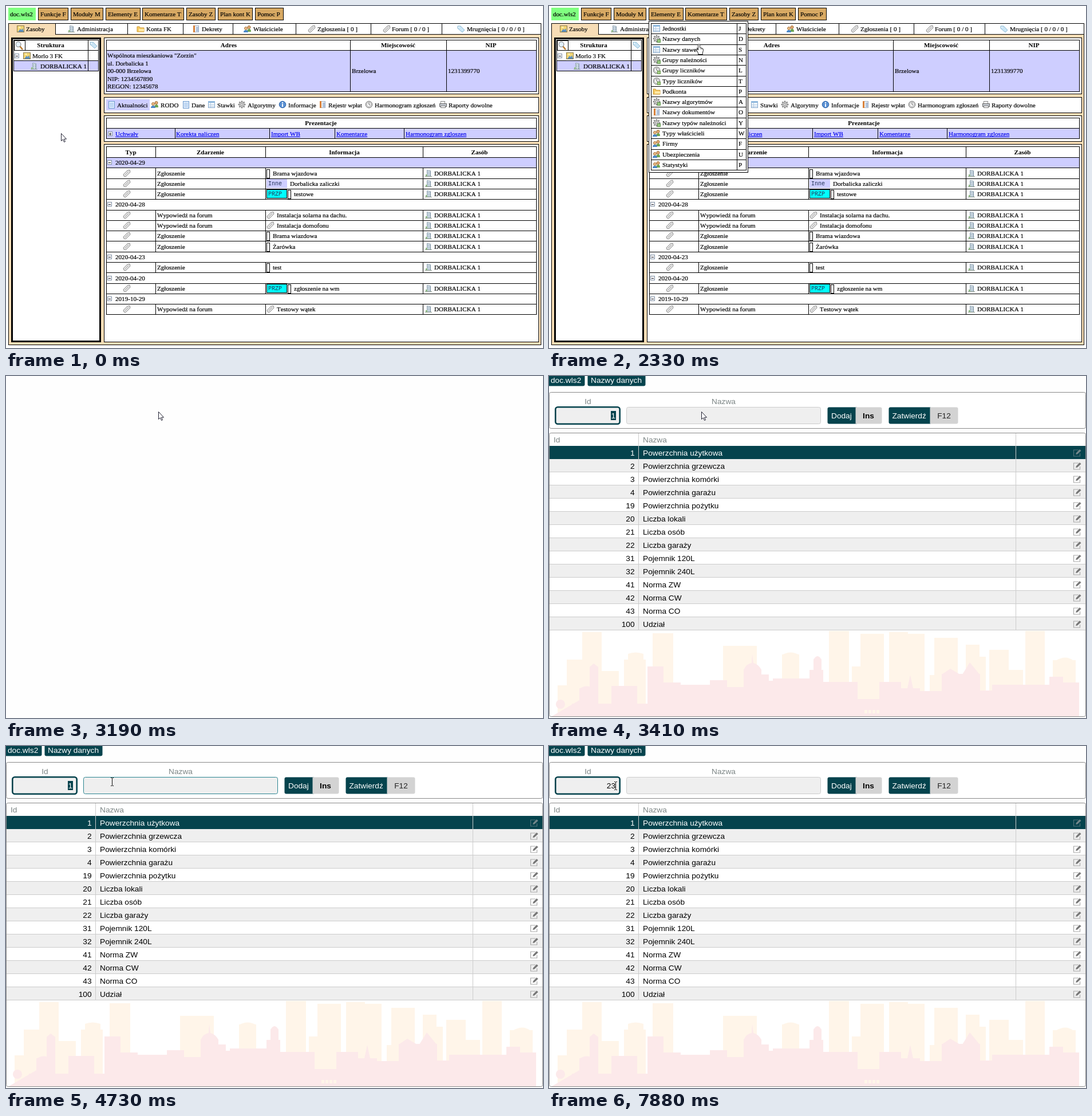
Write an HTML page with a canvas that moves like this. It is 938 px wide and 597 px high and loops after 7990 ms.

```html
<!DOCTYPE html>
<html lang="pl">
<head>
<meta charset="utf-8">
<title>Nazwy danych</title>
<style>
html, body { margin: 0; width: 100%; height: 100%; overflow: hidden; background: #fefefe; }
canvas { display: block; }
</style>
</head>
<body>
<canvas id="stage" width="938" height="597"></canvas>
<script>
const ctx = document.getElementById('stage').getContext('2d');
const LOOP = 7990;
const MENU_OPENS = 1460, PAGE_LEAVES = 3190, FORM_SHOWS = 3400, FORM_HOVER = 3530;
const SERIF = '"Liberation Serif", serif', SANS = '"Liberation Sans", sans-serif';
const WHEAT = '#f7ddb6', TAN = '#d8a963', LILAC = '#ceceff', TEAL = '#05434d', GREY = '#efefef';

// ---------- helpers ----------
function rect(x, y, w, h, fill, stroke, line = 1) {
  if (fill) { ctx.fillStyle = fill; ctx.fillRect(x, y, w, h); }
  if (stroke) {
    ctx.strokeStyle = stroke;
    ctx.lineWidth = line;
    ctx.strokeRect(x + line / 2, y + line / 2, w - line, h - line);
  }
}
function round(x, y, w, h, r, fill, stroke, line = 1) {
  ctx.beginPath();
  ctx.roundRect(x + line / 2, y + line / 2, w - line, h - line, r);
  if (fill) { ctx.fillStyle = fill; ctx.fill(); }
  if (stroke) { ctx.strokeStyle = stroke; ctx.lineWidth = line; ctx.stroke(); }
}
const hLine = (x1, x2, y, color = '#000') => rect(x1, Math.round(y), x2 - x1, 1, color);
const vLine = (x, y1, y2, color = '#000') => rect(x, Math.round(y1), 1, Math.round(y2) - Math.round(y1), color);
function text(str, x, y, font, color = '#000', align = 'left') {
  ctx.font = font;
  ctx.fillStyle = color;
  ctx.textAlign = align;
  ctx.fillText(str, x, y);
}
// Small serif text gets a hairline outline so that thin stems stay dark.
function serif(str, x, y, color = '#000') {
  text(str, x, y, '11.1px ' + SERIF, color);
  ctx.strokeStyle = color;
  ctx.lineWidth = .2;
  ctx.strokeText(str, x, y);
}
const heading = (str, x, y) => text(str, x, y, 'bold 11.1px ' + SERIF, '#000', 'center');
const sans = (str, x, y, color, align, weight = '') => text(str, x, y, weight + ' 13.7px ' + SANS, color, align);
function disc(x, y, r, fill, stroke) {
  ctx.beginPath();
  ctx.arc(x, y, r, 0, Math.PI * 2);
  if (fill) { ctx.fillStyle = fill; ctx.fill(); }
  if (stroke) { ctx.strokeStyle = stroke; ctx.lineWidth = 1; ctx.stroke(); }
}
function shape(d, fill, stroke, line = 1) {
  const p = new Path2D(d);
  if (fill) { ctx.fillStyle = fill; ctx.fill(p); }
  if (stroke) { ctx.strokeStyle = stroke; ctx.lineWidth = line; ctx.stroke(p); }
}

// ---------- icons, drawn around their centre ----------
const icons = {
  picture() {
    rect(-7, -6, 13, 12, '#f2d675', '#8c7a4a');
    shape('M-5 5L-1 0L1 2L3 -1L5 5Z', '#5b8fc0');
    disc(-2, -3, 1.5, '#fff6c0');
  },
  building() {
    shape('M-2.500 5.500V-5.500L3.500 -4.500V5.500Z', '#d3dfe8', '#8fa0ae');
    for (let y = -3; y < 4; y += 3) { rect(-1, y, 1, 2, '#7e98ad'); rect(2, y, 1, 2, '#7e98ad'); }
    rect(-5, 2, 3, 4, '#93bd8b');
    rect(-6, 5, 12, 1, '#8f9c8f');
  },
  folder() {
    shape('M-6 -4H-2L-1 -2H6V5H-6Z', '#f5ca62', '#cf9b37');
    rect(-3, 0, 9, 4, '#ffe9a5');
  },
  book() {
    rect(-4, -6, 9, 12, '#eef2f8', '#9cabc1');
    rect(-5, -6, 3, 12, '#d8823c');
    for (let y = -3; y < 4; y += 2) hLine(0, 4, y, '#7796c0');
  },
  people() {
    disc(2.5, -3, 2.5, '#e6b077', '#9c632d');
    shape('M-1 5Q-1 0 3 0Q6 0 6 5Z', '#6da552');
    disc(-3, -1, 2.4, '#efc38d', '#a46c34');
    shape('M-7 6Q-7 2 -3 2Q1 2 1 6Z', '#4a87c7');
  },
  clip() {
    shape('M-6 2L1 -5L5 -6L6 -2L-1 5Q-3 7 -5 5Z', '#e4e4e4', '#8e8e8e');
    shape('M-3 3L3 -3', null, '#a2a2a2');
  },
  tag() {
    shape('M-6 -5H-1L6 2L2 6L-6 -1Z', '#cae5f5', '#8bb8d2');
    disc(-4, -3, 1, '#fff');
  },
  doc() {
    rect(-5, -6, 11, 13, '#e3efff', '#6a98cd');
    for (let y = -3; y < 4; y += 2) hLine(-3, 4, y, '#a0c2e8');
  },
  list() {
    rect(-6, -6, 12, 12, '#f2f8ff', '#86a9ce');
    rect(-6, -6, 12, 3, '#8fb8dd');
    hLine(-5, 5, 0, '#b6cbe0');
    hLine(-5, 5, 3, '#b6cbe0');
    vLine(-2, -3, 5, '#b6cbe0');
  },
  gear() {
    for (let i = 0; i < 8; i++) {
      ctx.save();
      ctx.rotate(i * Math.PI / 4);
      rect(-1.2, -6.5, 2.4, 3, '#8c8c8c');
      ctx.restore();
    }
    disc(0, 0, 4.3, '#d0d0d0', '#888');
    disc(0, 0, 1.7, '#fff', '#888');
  },
  gears() {
    icons.gear();
    rect(1, 1, 6, 6, '#9ccb85', '#5d944a');
  },
  clock() {
    disc(0, 0, 5.8, '#e2e2e2', '#777');
    disc(0, 0, 3.8, '#fff', '#aaa');
    shape('M0 -3V0L2 1', null, '#555');
  },
  meter() {
    icons.clock();
    rect(1, 1, 6, 6, '#a4cc84', '#67964a');
  },
  info() {
    disc(0, 0, 5.8, '#5a90d2', '#2e63a8');
    rect(-1, -4, 2, 2, '#fff');
    rect(-1, -1, 2, 5, '#fff');
  },
  printer() {
    rect(-4, -6, 8, 6, '#fff', '#888');
    rect(-6, -2, 13, 6, '#c3c8cf', '#666');
    rect(-4, 2, 9, 4, '#fff', '#777');
  },
  search() {
    shape('M1 1L6 7', null, '#b87a2f', 2.5);
    disc(-1.5, -2, 4.5, '#e4f1fb', '#777');
  },
  minus() {
    rect(-4, -4, 8, 8, '#f4f4f4', '#8393a8');
    rect(-2, 0, 4, 1, '#223');
  },
  plus() {
    icons.minus();
    rect(-0.5, -2, 1, 5, '#223');
  }
};
function icon(name, x, y) {
  ctx.save();
  ctx.translate(Math.round(x), Math.round(y));
  icons[name]();
  ctx.restore();
}

// ---------- first screen ----------
const STREET = 'Dorbalicka', CITY = 'Brzelowa', UNIT = STREET.toUpperCase() + ' 1';
const buttons = [['Funkcje F', 56, 109], ['Moduły M', 113, 170], ['Elementy E', 174, 235], ['Komentarze T', 238, 311],
  ['Zasoby Z', 315, 366], ['Plan kont K', 370, 431], ['Pomoc P', 435, 485]];
const tabs = [['picture', 26, 'Zasoby', 35], ['building', 114, 'Administracja', 124], ['folder', 235, 'Konta FK', 245],
  ['book', 332, 'Dekrety', 342], ['people', 422, 'Właściciele', 432], ['clip', 534, 'Zgłoszenia [ 0 ]', 544],
  ['clip', 665, 'Forum [ 0 / 0 ]', 674], ['tag', 795, 'Mrugnięcia [ 0 / 0 / 0 ]', 805]];
const tools = [['doc', 184, 'Aktualności'], ['people', 260, 'RODO'], ['doc', 314, 'Dane'], ['list', 359, 'Stawki'],
  ['gear', 412, 'Algorytmy'], ['info', 483, 'Informacje'], ['book', 553, 'Rejestr wpłat'],
  ['clock', 634, 'Harmonogram zgłoszeń'], ['printer', 763, 'Raporty dowolne']];
const links = [['Uchwały', 191], ['Korekta naliczen', 297], ['Import WB', 463], ['Komentarze', 577], ['Harmonogram zgloszen', 698]];
const events = [['date', '2020-04-29'], ['bar', 'Brama wjazdowa'], ['inne', STREET + ' zaliczki'], ['przp', 'testowe'],
  ['date', '2020-04-28'], ['forum', 'Instalacja solarna na dachu.'], ['forum', 'Instalacja domofonu'],
  ['bar', 'Brama wiazdowa'], ['bar', 'Żarówka'], ['date', '2020-04-23'], ['bar', 'test'],
  ['date', '2020-04-20'], ['przp', 'zgłoszenie na wm'], ['date', '2019-10-29'], ['forum', 'Testowy wątek']];
const menu = [['list', 'Jednostki', 'J'], ['gears', 'Nazwy danych', 'D'], ['list', 'Nazwy stawek', 'S'],
  ['gears', 'Grupy należności', 'N'], ['meter', 'Grupy liczników', 'L'], ['meter', 'Typy liczników', 'T'],
  ['folder', 'Podkonta', 'P'], ['gears', 'Nazwy algorytmów', 'A'], ['book', 'Nazwy dokumentów', 'O'],
  ['gears', 'Nazwy typów należności', 'Y'], ['people', 'Typy właścicieli', 'W'], ['people', 'Firmy', 'F'],
  ['people', 'Ubezpieczenia', 'U'], ['people', 'Statystyki', 'P']];
const STEP = 18.3;

const panel = (y, h) => rect(171, y, 760, h, '#fff', '#000');
const badge = (str, y, fill, stroke) => {
  rect(455, y - 8, 36, 16, fill, stroke);
  text(str, 458, y + 3, '10px "Liberation Mono", monospace', '#235');
};

function drawTop() {
  rect(4, 3, 48, 22, '#80ff80');
  serif('doc.wls2', 7, 18);
  for (const [label, x1, x2] of buttons) {
    rect(x1, 3, x2 - x1, 22, TAN, '#000');
    serif(label, x1 + 4, 18);
  }
  rect(4, 49, 931, 543, WHEAT, '#000');
  rect(4, 30, 931, 20, '#fff', '#000');
  rect(5, 31, 82, 19, WHEAT);
  for (const x of [86, 212, 309, 396, 506, 637, 761]) vLine(x, 30, 50);
  for (const [name, x, label, tx] of tabs) {
    icon(name, x, 40);
    serif(label, tx, 44);
  }
}

function drawTree() {
  rect(9, 55, 157, 532, '#fff', '#000', 3);
  rect(13, 59, 149, 55, '#fff', '#000');
  rect(14, 96, 147, 17, LILAC);
  hLine(13, 162, 77);
  hLine(13, 162, 95);
  vLine(143, 59, 114);
  rect(14, 60, 20, 18, '#fff', '#000');
  icon('search', 23, 69);
  heading('Struktura', 78, 72);
  icon('tag', 153, 68);
  icon('minus', 19, 87);
  icon('picture', 37, 87);
  serif('Morlo 3 FK', 46, 91);
  icon('building', 49, 105);
  serif(UNIT, 60, 109);
}

function drawDetails() {
  panel(55, 99);
  rect(175, 59, 752, 91, LILAC, '#000');
  rect(176, 60, 750, 17, '#fff');
  hLine(175, 927, 77);
  vLine(601, 59, 150);
  vLine(769, 59, 150);
  heading('Adres', 389, 72);
  heading('Miejscowość', 685, 72);
  heading('NIP', 847, 72);
  ['Wspólnota mieszkaniowa "Zorzin"', 'ul. ' + STREET + ' 1', '00-000 ' + CITY, 'NIP: 1234567890', 'REGON: 12345678']
    .forEach((line, i) => serif(line, 177, Math.round(90 + i * 13.6)));
  serif(CITY, 604, 117);
  serif('1231399770', 772, 117);

  panel(159, 28);
  rect(175, 163, 76, 19, LILAC);
  for (const [name, x, label] of tools) {
    icon(name, x, 172);
    serif(label, x + 10, 177);
  }

  panel(191, 46);
  rect(175, 195, 752, 37, LILAC, '#000');
  rect(176, 196, 750, 17, '#fff');
  hLine(175, 927, 213);
  heading('Prezentacje', 550, 208);
  for (const x of [295, 460, 574, 695]) vLine(x, 213, 232);
  icon('plus', 182, 223);
  for (const [label, x] of links) {
    serif(label, x, 227, '#00e');
    hLine(x, x + ctx.measureText(label).width, 228, '#00e');
  }
}

function drawEvents() {
  panel(241, 346);
  rect(175, 245, 752, 294, '#fff', '#000');
  rect(176, 265, 750, 17, LILAC);
  const columns = (y1, y2) => [261, 453, 728].forEach(x => vLine(x, y1, y2));
  columns(245, 264);
  heading('Typ', 218, 259);
  heading('Zdarzenie', 357, 259);
  heading('Informacja', 591, 259);
  heading('Zasób', 827, 259);
  events.forEach(([kind, label], i) => {
    const top = 264 + i * STEP, y = Math.round(top + 9.2), base = y + 4;
    hLine(175, 927, top);
    if (kind === 'date') {
      icon('minus', 181, y);
      serif(label, 191, base);
      return;
    }
    columns(top, top + STEP);
    icon('clip', 211, y);
    serif(kind === 'forum' ? 'Wypowiedź na forum' : 'Zgłoszenie', 264, base);
    let x = 466;
    if (kind === 'forum') { icon('clip', 462, y); x = 473; }
    if (kind === 'bar') rect(455, y - 7, 6, 16, '#fff', '#000');
    if (kind === 'inne') { badge('Inne', y, LILAC); x = 496; }
    if (kind === 'przp') {
      badge('PRZP', y, '#0ff', '#000');
      rect(492, y - 7, 6, 16, '#fff', '#000');
      x = 503;
    }
    serif(label, x, base);
    icon('building', 738, y);
    serif(UNIT, 748, base);
  });
}

function drawMenu() {
  rect(174, 26, 174, 265, '#fff', '#000');
  rect(178, 30, 167, 257, '#fff', '#000');
  vLine(328, 30, 287);
  menu.forEach(([name, label, key], i) => {
    const y = 30 + i * STEP;
    if (i) hLine(178, 345, y);
    icon(name, 188, y + 9);
    serif(label, 198, Math.round(y + 13));
    serif(key, 331, Math.round(y + 13));
  });
}

// ---------- second screen ----------
const records = [[1, 'Powerzchnia użytkowa'], [2, 'Powierzchnia grzewcza'], [3, 'Powierzchnia komórki'],
  [4, 'Powierzchnia garażu'], [19, 'Powierzchnia pożytku'], [20, 'Liczba lokali'], [21, 'Liczba osób'],
  [22, 'Liczba garaży'], [31, 'Pojemnik 120L'], [32, 'Pojemnik 240L'], [41, 'Norma ZW'], [42, 'Norma CW'],
  [43, 'Norma CO'], [100, 'Udział']];
// Buildings as left, right, top.
const towers = [[15, 31, 540], [31, 58, 495], [58, 92, 447], [92, 122, 515], [131, 169, 495], [138, 165, 485],
  [181, 217, 449], [304, 363, 471], [407, 437, 486], [489, 524, 445], [529, 545, 507], [544, 585, 450],
  [594, 627, 447], [627, 656, 450], [673, 714, 457], [728, 752, 469], [752, 763, 490], [769, 803, 478],
  [803, 828, 513], [832, 866, 445], [880, 920, 496], [665, 690, 522]];
const houses = [[53, 78, 545], [71, 86, 508], [109, 154, 541], [172, 200, 507], [191, 230, 535], [230, 281, 539],
  [281, 311, 531], [311, 340, 543], [340, 371, 512], [371, 384, 521], [384, 391, 532], [391, 470, 528],
  [455, 479, 513], [476, 539, 534], [577, 615, 534], [615, 648, 545], [648, 686, 550], [686, 718, 520],
  [718, 753, 520], [753, 774, 549], [774, 874, 539], [874, 898, 525], [898, 926, 535]];

function drawSkyline() {
  const cream = '#fff5e9', pink = '#fce9ea';
  const block = color => ([l, r, top]) => rect(l, top, r - l, 594 - top, color);
  towers.forEach(block(cream));
  shape('M138 485Q151 480 165 485ZM407 487Q422 478 437 487ZM885 497Q903 486 916 497Z', cream);
  houses.forEach(block(pink));
  rect(40, 572, 886, 22, pink);
  rect(535, 564, 46, 30, pink);
  shape('M5 594L53 566V594ZM53 546Q66 537 78 546ZM71 508L78 502L86 508Z', pink);
  shape('M340 513Q345 502 354 501L355 485L357 501Q366 503 371 513Z', pink);
  shape('M462 513V495Q469 483 476 495V513ZM626 545L631 522L636 545ZM686 521L701 511L718 521ZM722 521L735 500L752 521Z', pink);
  disc(20, 573, 8, pink);
  for (let x = 551; x < 578; x += 7) rect(x, 583, 5, 6, cream);
}

function drawEditIcon(y, dark) {
  const color = dark ? '#71868a' : '#777';
  ctx.save();
  ctx.translate(916, y);
  shape('M9 2H.5V13H11.5V8', null, dark ? '#52737a' : '#aaa', 1.2);
  shape('M4 10L5 7L11 1L13.500 3.500L7 9.500Z', color);
  ctx.restore();
}

function drawForm(value, selected, hover) {
  sans('', 0, 0);
  round(-4, -4, 67, 22, 3, TEAL);
  sans('doc.wls2', 3, 12, '#fff');
  round(67, -4, 102, 22, 3, TEAL);
  sans('Nazwy danych', 73, 12, '#fff');

  round(0, 28, 938, 64, 3, '#fff', '#8a8a8a');
  sans('Id', 68, 49, '#7c8585', 'center');
  sans('Nazwa', 305, 49, '#7c8585', 'center');
  round(10, 53, 115, 32, 4, GREY, TEAL, 2.6);
  round(135, 54, 340, 30, 3, GREY, hover ? '#2a8490' : '#ccc');
  if (selected) rect(108, 61, 9, 16, TEAL);
  sans(value, 116, 74, selected ? '#fff' : '#000', 'right');

  round(486, 54, 54, 30, 3, TEAL);
  round(535, 54, 47, 30, [0, 3, 3, 0], '#d3d3d3');
  sans('Dodaj', 493, 74, '#fff');
  sans('Ins', 558, 74, '#000', 'center', 'bold');
  round(593, 54, 76, 30, 3, TEAL);
  round(665, 54, 50, 30, [0, 3, 3, 0], '#d3d3d3');
  sans('Zatwierdź', 599.5, 74, '#fff');
  sans('F12', 690, 74, '#222', 'center');

  round(0, 99, 938, 496, 3, '#fff');
  drawSkyline();
  sans('Id', 8, 116, '#7c8585');
  sans('Nazwa', 164, 116, '#7c8585');
  records.forEach(([id, name], i) => {
    const y = 122 + i * 23, color = i ? '#000' : '#fff';
    rect(1, y, 936, 23, i ? (i % 2 ? GREY : '#fff') : TEAL);
    hLine(1, 937, y + 22, i ? '#ccc' : TEAL);
    sans(id, 149.5, y + 17, color, 'right');
    sans(name, 164, y + 17, color);
    drawEditIcon(y + 5, !i);
  });
  vLine(156, 100, 444, '#ccc');
  vLine(815, 100, 444, '#ccc');
  round(0, 99, 938, 496, 3, null, '#8a8a8a');
}

// ---------- pointer ----------
// Each move: start time, number of steps, end x, end y, time per step.
const moves = [[240, 8, 217, 22], [1120, 1, 217, 15], [1890, 5, 262, 66], [2540, 3, 267, 61], [PAGE_LEAVES, 1, 266, 62],
  [FORM_HOVER, 1, 268, 62], [4730, 2, 101, 61, 90], [5050, 1, 101, 66], [5270, 1, 100, 69], [7660, 3, 116, 69]];
const clicks = [[1230, MENU_OPENS, 219, 15], [2970, PAGE_LEAVES, 267, 61], [5490, 5700, 98.5, 68.5]];
const ease = p => p * p * (3 - 2 * p);

function pointerAt(t) {
  let x = 96, y = 222;
  for (const [start, steps, toX, toY, gap = 110] of moves) {
    if (t < start) break;
    const p = ease(Math.min(1, (Math.floor((t - start) / gap) + 1) / steps));
    x += (toX - x) * p;
    y += (toY - y) * p;
  }
  let kind = 'beam';
  if (t < PAGE_LEAVES) kind = y < 50 || t >= 1120 ? 'hand' : 'arrow';
  else if (t < FORM_HOVER) kind = 'arrow';
  return { x: Math.round(x), y: Math.round(y), kind };
}

const pointers = {
  arrow() { shape('M.5 .5V13.500L3.500 10.900L5.500 15.500L7.500 14.700L5.500 10.200H9.500Z', '#fff', '#223'); },
  hand() {
    shape('M-1.500 1.500Q0 -.5 1.500 1.500V6.500L6.200 8Q8 9 7.500 11.500L6.500 15V18.500H-1.500V16L-4.500 11Q-4.500 8.500 -2.500 10L-1.500 11Z', '#fff', '#222');
    shape('M3.500 7.500V10M5.700 8V10.500', null, '#555', .8);
  },
  beam() { shape('M.5 -6V7M-2 -6.500H0M1 -6.500H3M-2 7.500H0M1 7.500H3', null, '#111'); }
};

function draw(t) {
  const pointer = pointerAt(t);
  rect(0, 0, 938, 597, t < PAGE_LEAVES ? '#fff' : '#fefefe');
  if (t < PAGE_LEAVES) {
    drawTop();
    drawTree();
    drawDetails();
    drawEvents();
    if (t >= MENU_OPENS) drawMenu();
  } else if (t >= FORM_SHOWS) {
    const value = t < 7450 ? '1' : t < 7660 ? '2' : '23';
    const selected = t < 5490 || (t >= 5700 && t < 7450);
    drawForm(value, selected, pointer.kind === 'beam' && pointer.x >= 135);
  }
  for (const [from, to, x, y] of clicks) {
    if (t >= from && t < to) disc(x, y, 10, 'rgba(255,215,0,.7)');
  }
  ctx.save();
  ctx.translate(pointer.x, pointer.y);
  pointers[pointer.kind]();
  ctx.restore();
}

ctx.fontKerning = 'none';
const began = performance.now();
function tick() {
  draw((performance.now() - began) % LOOP);
  requestAnimationFrame(tick);
}
tick();
</script>
</body>
</html>
```
